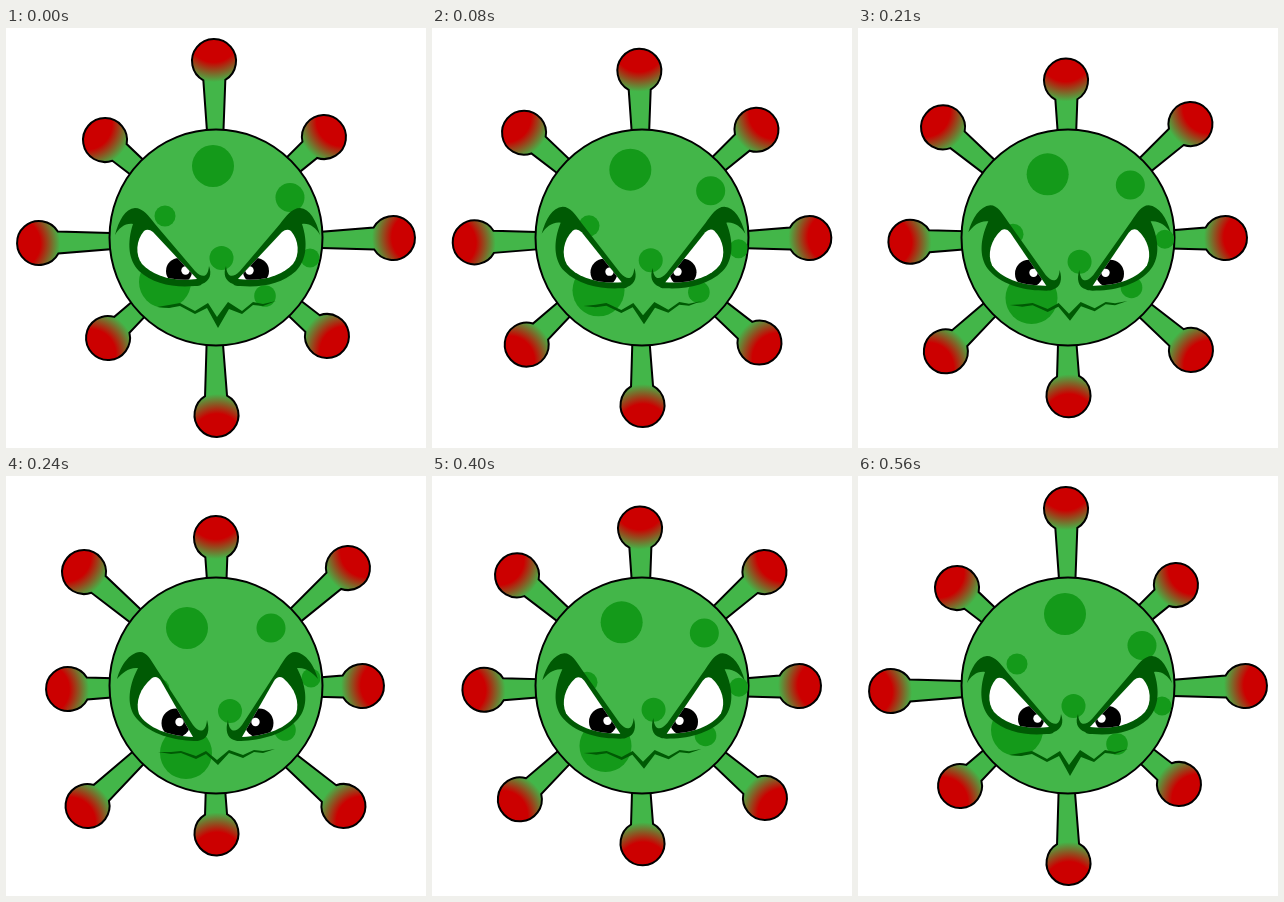
An HTML page that plays this animation: 420 px wide and 420 px high, repeating every 640 ms.

```html
<!DOCTYPE html>
<html lang="en">
<head>
<meta charset="utf-8">
<title>Angry virus</title>
<style>
  html, body { margin: 0; width: 100%; height: 100%; overflow: hidden; background: #fff; }
  svg { display: block; width: 100%; height: 100%; }
</style>
</head>
<body>
<svg viewBox="0 0 420 420">
  <defs>
    <radialGradient id="tip" gradientUnits="userSpaceOnUse" cx="-24" cy="0" r="45">
      <stop offset="0.56" stop-color="#c00"/>
      <stop offset="1" stop-color="#43b649"/>
    </radialGradient>
    <clipPath id="body"><ellipse cx="210" cy="209.5" rx="106" ry="107.5"/></clipPath>
    <clipPath id="socket"><path class="white"/></clipPath>
  </defs>
  <g id="spikes" fill="url(#tip)" stroke="#000" stroke-width="2"></g>
  <ellipse cx="210" cy="209.5" rx="106.5" ry="108" fill="#43b649" stroke="#000" stroke-width="2"/>
  <g id="spots" fill="#149a1a" clip-path="url(#body)"></g>
  <g id="eye">
    <path id="brow" fill="#005a04"/>
    <path class="white" fill="#fff"/>
    <g clip-path="url(#socket)">
      <circle id="pupil"/>
      <circle id="glint" r="4.2" fill="#fff"/>
    </g>
  </g>
  <use href="#eye" transform="translate(423 0) scale(-1 1)"/>
  <path id="mouth" fill="#005a04"/>
</svg>
<script>
const STEP = 80;
const POSES = [0, 1, 2, 3, 3, 2, 1, 0];

// Each part slides between two points; "bow" is the offset from the straight line.
const SPIKES = [
  { from: [208, 33], to: [210, 62], bow: [-1.3, 0], angle: 89 },
  { from: [318, 109], to: [342, 92], bow: [-1.5, -1.6], angle: 138 },
  { from: [387, 210], to: [356, 210], bow: [0.7, 0], angle: 178.5 },
  { from: [321, 308], to: [337.5, 330], bow: [1, -0.7], angle: -139.3 },
  { from: [210.5, 387], to: [210.5, 357.5], angle: -91.4 },
  { from: [102, 310], to: [81.5, 330], bow: [-0.5, 0], angle: -43.5 },
  { from: [33, 215], to: [62, 213], angle: -1.5 },
  { from: [99, 112], to: [78, 96], bow: [0, -2], angle: 40.5 }
];
const SPOTS = [
  { from: [207, 138], to: [181, 152], bow: [0, -1], r: 21 },
  { from: [284, 169.5], to: [265, 152], bow: [1, -0.8], r: 14.5 },
  { from: [159, 188], to: [153, 213], bow: [0, 1.5], r: 10.5 },
  { from: [215.5, 230], to: [224, 235], bow: [0.4, 0.5], r: 12 },
  { from: [304, 230], to: [305, 202], bow: [2.2, 0], r: 9.5 },
  { from: [259, 268], to: [279, 254], bow: [1.2, 0.8], r: 10.8 },
  { from: [159, 254], to: [180, 277], bow: [0.5, 0.7], r: 26 }
];
const SHAPES = {
  "#brow": [
    "M109 207C113 192 119 181 129 180C137 180 143 188 149 196L189 243C197 251 202 249 203 238C206 246 204 253 196 256C194 258 192 258 189 258C168 260 147 256 133 243C122 232 121 214 127 196C119 195 113 200 109 207Z",
    "M111 203C115 189 123 177 134 176C141 176 145 184 150 192L187 249C194 258 200 256 201 244C204 254 202 262 195 264C193 265 191 265 188 265C168 264 145 259 131 243C121 232 121 213 132 192C123 191 116 197 111 203Z"
  ],
  ".white": [
    "M138 203C130 212 129 227 136 236C146 247 165 254 191 251L147 204Q142 200 138 203Z",
    "M146 202C134 212 129 226 133 238C141 252 163 260 187 261L155 205Q151 199 146 202Z"
  ],
  "#mouth": [
    "M151 279L163 277L174 275L189 283L202 275L211 289L222 274L236 283L247 274L257 276L270 273L257 278L247 277L236 286L223 281L212 300L201 280L189 286L174 278L163 280Z",
    "M152 276L165 276L175 275L190 280L200 275L211 284L223 274L237 279L248 274L257 275L269 273L257 277L248 276L237 282L223 277L212 289L200 278L190 283L175 277L165 278Z"
  ]
};
const SPIKE_PATH = "M19.1 -11A22 22 0 1 0 19.1 11L80 7.7V-7.7Z";

const $ = selector => document.querySelector(selector);
const lerp = (a, b, t) => a + (b - a) * t;

function add(parent, tag, attrs) {
  const node = document.createElementNS("http://www.w3.org/2000/svg", tag);
  set(node, attrs);
  return parent.appendChild(node);
}

function set(node, attrs) {
  for (const key in attrs) node.setAttribute(key, attrs[key]);
}

function place({ from, to, bow = [0, 0] }, t) {
  return from.map((start, i) => lerp(start, to[i], t) + bow[i] * 4.5 * t * (1 - t));
}

function morph([a, b], t) {
  const ends = b.match(/\d+/g);
  let i = 0;
  return a.replace(/\d+/g, n => lerp(+n, +ends[i++], t).toFixed(2));
}

const spikeNodes = SPIKES.map(() => add($("#spikes"), "path", { d: SPIKE_PATH }));
const spotNodes = SPOTS.map(({ r }) => add($("#spots"), "circle", { r }));

function draw(t) {
  SPIKES.forEach((spike, i) => {
    const [x, y] = place(spike, t);
    set(spikeNodes[i], { transform: `translate(${x} ${y}) rotate(${spike.angle})` });
  });
  SPOTS.forEach((spot, i) => {
    const [cx, cy] = place(spot, t);
    set(spotNodes[i], { cx, cy });
  });
  for (const selector in SHAPES) {
    const d = morph(SHAPES[selector], t);
    document.querySelectorAll(selector).forEach(node => set(node, { d }));
  }
  set($("#pupil"), { cx: lerp(173, 170, t), cy: lerp(243, 247, t), r: lerp(13, 14.5, t) });
  set($("#glint"), { cx: lerp(179.5, 173.5, t), cy: lerp(242.5, 246, t) });
}

let start;
function tick(now) {
  start ??= now;
  const step = Math.floor((now - start) / STEP) % POSES.length;
  draw(POSES[step] / 3);
  requestAnimationFrame(tick);
}

draw(0);
requestAnimationFrame(tick);
</script>
</body>
</html>
```
